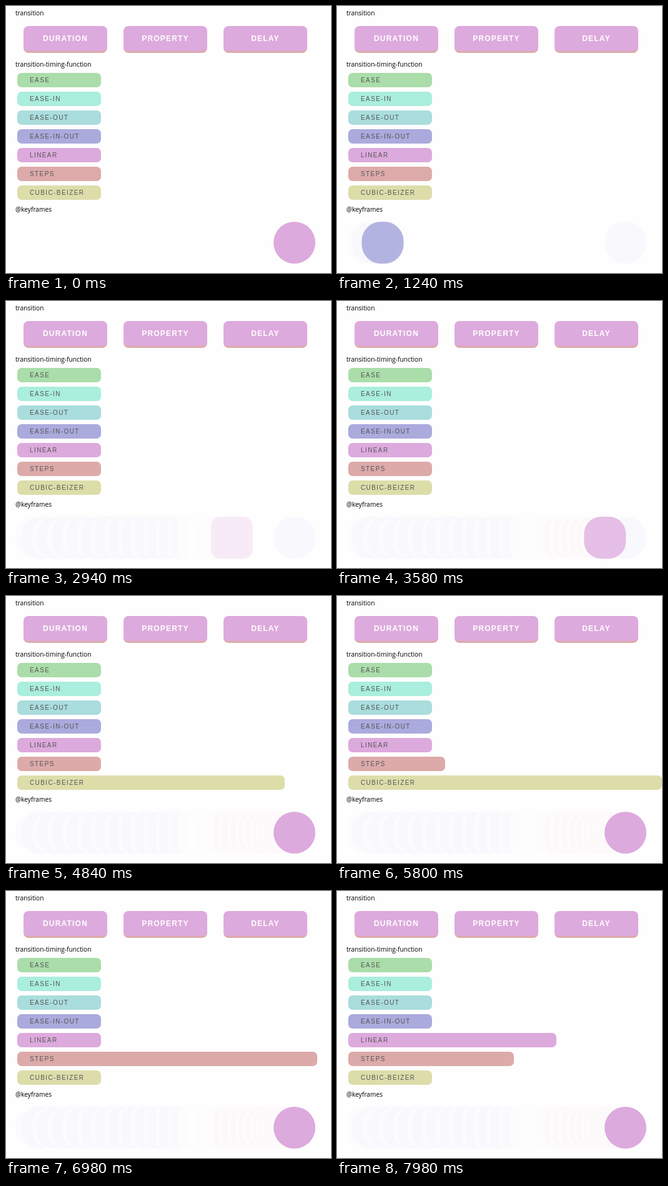
Recreate the animation shown at these times as an HTML page. Size 520 by 427 pixels, loop 8000 ms.

```html
<!DOCTYPE html>
<html lang="en">
<head>
<meta charset="utf-8">
<title>CSS transitions</title>
<style>
html, body { margin: 0; width: 100%; height: 100%; overflow: hidden; background: #fefefe; }
#stage { position: absolute; left: 0; top: 0; width: 520px; height: 427px; overflow: hidden; }
#stage div { position: absolute; box-sizing: border-box; white-space: nowrap; }
#stage .label { left: 15px; font: 10.2px/14px "Open Sans", "Noto Sans", sans-serif; color: #000; }
#stage .button {
  top: 32px; width: 134px; height: 43px; border-radius: 8px;
  background: #dad; border-bottom: 3px solid #daa; color: #fff; text-align: center;
  font: bold 12px/40px "Liberation Sans", Arial, sans-serif; letter-spacing: 1.2px;
}
#stage .bar {
  left: 18px; width: 134px; height: 23px; padding-left: 20px; border-radius: 7px; color: #555;
  font: 10px/23px "Liberation Sans", Arial, sans-serif; letter-spacing: 1.4px;
}
#stage .ball { left: 0; top: 345px; width: 67px; height: 67px; border-radius: 50%; }
</style>
</head>
<body>
<div id="stage"></div>
<script>
const LOOP = 8000;
const stage = document.getElementById('stage');

function add(cls, style, text = '') {
  const el = document.createElement('div');
  el.className = cls;
  el.textContent = text;
  Object.assign(el.style, style);
  return stage.appendChild(el);
}

const clamp = v => Math.max(0, Math.min(1, v));

function bezier(x1, y1, x2, y2) {
  const at = (a, b, s) => 3 * (1 - s) * (1 - s) * s * a + 3 * (1 - s) * s * s * b + s * s * s;
  return t => {
    if (t <= 0 || t >= 1) return clamp(t);
    let lo = 0, hi = 1;
    for (let i = 0; i < 30; i++) {
      const mid = (lo + hi) / 2;
      if (at(x1, x2, mid) < t) lo = mid; else hi = mid;
    }
    return at(y1, y2, lo);
  };
}

const easeOut = bezier(0, 0, 0.58, 1);
const back = bezier(0.68, -0.55, 0.265, 1.55);
const steps = t => Math.floor(clamp(t) * 50) / 50;

// Static parts
[['transition', 4], ['transition-timing-function', 86], ['@keyframes', 318]]
  .forEach(([text, top]) => add('label', { top: top + 'px' }, text));
['DURATION', 'PROPERTY', 'DELAY']
  .forEach((text, i) => add('button', { left: 28 + 160 * i + 'px' }, text));

const bars = [
  ['EASE', '#ada'], ['EASE-IN', '#aed'], ['EASE-OUT', '#add'], ['EASE-IN-OUT', '#aad'],
  ['LINEAR', '#dad'], ['STEPS', '#daa'], ['CUBIC-BEIZER', '#dda']
].map(([text, background], i) => add('bar', { top: 107 + 30 * i + 'px', background }, text));

// Ball: slides right while fading and squaring off towards the middle
const START = 500, MOVE = 1127, SPAN = 3180;

function pose(t) {
  const fade = t < 0.5 ? 1 - easeOut(t * 2) : easeOut(t * 2 - 1);
  return {
    transform: `translateX(${15 + 413 * easeOut(t)}px)`,
    borderRadius: 10 + 23.5 * fade + 'px',
    background: t < 0.5 ? '#aad' : '#dad',
    opacity: fade
  };
}

// Faint streaks left behind the ball
function tint(t, i) {
  const k = Math.min(1, Math.abs(t - 0.5) / 0.1) * (i % 3 ? 1 : 0.4);
  const drop = t < 0.5 ? [6, 6, 1] : [1, 5, 3];
  return `rgb(${drop.map(d => 254 - d * k)})`;
}

const trail = [{ el: add('ball', { ...pose(1), background: '#f8f8fd' }), from: START }];
for (let i = 0; i * 40 < SPAN; i++) {
  const t = i * 40 / SPAN;
  const el = add('ball', { ...pose(t), opacity: 1, background: tint(t, i) });
  trail.push({ el, from: MOVE + i * 40 });
}
const ball = add('ball', {});

function setBar(i, grow) {
  bars[i].style.width = 134 + 346 * Math.max(0, grow) + 'px';
}

function draw(now) {
  const ms = now % LOOP;
  const part = (from, length) => clamp((ms - from) / length);
  trail.forEach(({ el, from }) => { el.style.display = ms >= from ? '' : 'none'; });
  Object.assign(ball.style, pose(ms < START ? 1 : part(MOVE, SPAN)));
  setBar(4, part(7250, 1270));
  setBar(5, steps(part(5720, 1250)) - steps(part(7174, 1280)));
  setBar(6, back(part(4118, 1290)) - back(part(5680, 1290)));
}

const origin = performance.now();
function tick() {
  draw(performance.now() - origin);
  requestAnimationFrame(tick);
}
tick();
</script>
</body>
</html>
```
